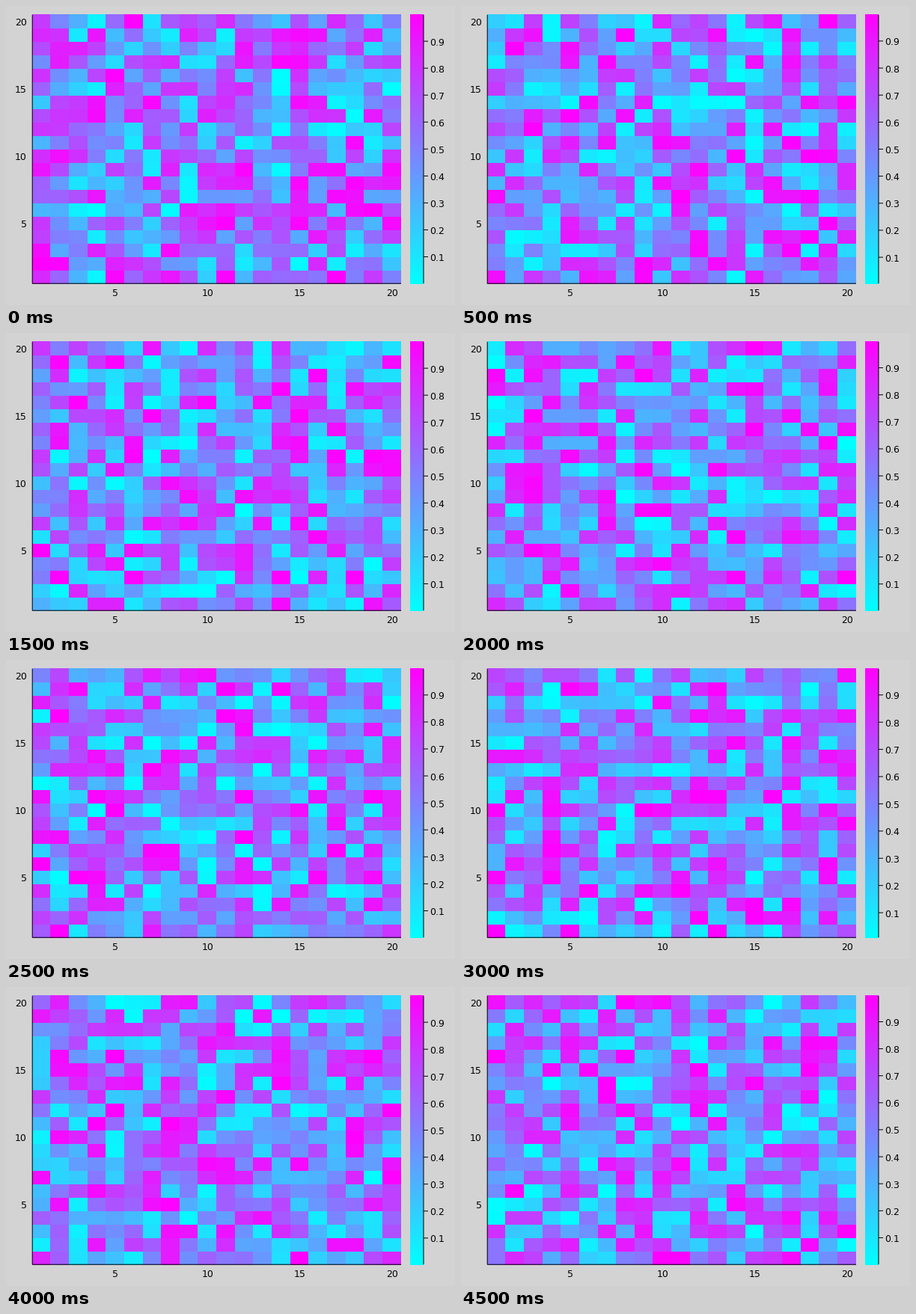
A matplotlib script for the animation above (5000 ms loop, 600x400 px).

```python
import numpy as np
import matplotlib.pyplot as plt
from matplotlib.animation import FuncAnimation

W, H, DPI = 600, 400, 100
N = 20
FRAMES, STEP = 10, 500
LEFT, RIGHT, TOP, BOTTOM = 35.2, 528, 11.8, 371.2
BAR_LEFT, BAR_RIGHT = 540, 558
PT = 72 / DPI

# Smallest and largest value of the noise in each frame
LOW = [0.001, 0.003, 0.002, 0.001, 0.002, 0.001, 0.009, 0.001, 0.002, 0.001]
HIGH = [0.998, 0.997, 0.997, 0.998, 0.996, 0.997, 0.996, 0.996, 0.998, 0.996]


def noise(i):
    z = np.random.default_rng(100 + i).random((N, N))
    z = (z - z.min()) / (z.max() - z.min())
    return LOW[i] + z * (HIGH[i] - LOW[i])


plt.rcParams["font.family"] = "DejaVu Sans"
fig = plt.figure(figsize=(W / DPI, H / DPI), dpi=DPI, facecolor="#d3d3d3")
ax = fig.add_axes([0, 0, 1, 1])


def mesh(x0, x1, z):
    rows, cols = z.shape
    return ax.pcolormesh(np.linspace(x0, x1, cols + 1),
                         np.linspace(BOTTOM, TOP, rows + 1), z,
                         cmap="cool", antialiased=False, snap=False)


def line(xs, ys):
    return ax.plot(xs, ys, color="black", lw=PT, snap=False,
                   solid_capstyle="butt", zorder=3)[0]


def label(x, y, text, ha):
    return ax.text(x, y, text, fontsize=9, ha=ha, va="center_baseline",
                   color="black")


heat = mesh(LEFT, RIGHT, noise(0))
mesh(BAR_LEFT, BAR_RIGHT, np.linspace(0, 1, 256)[:, None])
ax.set_xlim(0, W)
ax.set_ylim(H, 0)
ax.axis("off")

line([LEFT, LEFT], [TOP, BOTTOM])
line([LEFT, RIGHT], [BOTTOM, BOTTOM])
line([BAR_RIGHT, BAR_RIGHT], [TOP, BOTTOM])

for k in (5, 10, 15, 20):
    x = LEFT + (k - 0.5) * (RIGHT - LEFT) / N
    y = BOTTOM - (k - 0.5) * (BOTTOM - TOP) / N
    label(x, 383, str(k), "center")
    label(28, y + 0.5, str(k), "right")

levels = [k / 10 for k in range(1, 10)]
ticks = [line([BAR_RIGHT, 564], [0, 0]) for _ in levels]
names = [label(566, 0, f"{v:.1f}", "left") for v in levels]


def draw(i):
    heat.set_array(noise(i))
    heat.set_clim(LOW[i], HIGH[i])
    for v, tick, name in zip(levels, ticks, names):
        y = BOTTOM - (v - LOW[i]) / (HIGH[i] - LOW[i]) * (BOTTOM - TOP)
        tick.set_ydata([y, y])
        name.set_y(y + 0.5)
    return [heat, *ticks, *names]


anim = FuncAnimation(fig, draw, frames=FRAMES, interval=STEP,
                     repeat=True, repeat_delay=0, blit=False)
plt.show()
```
